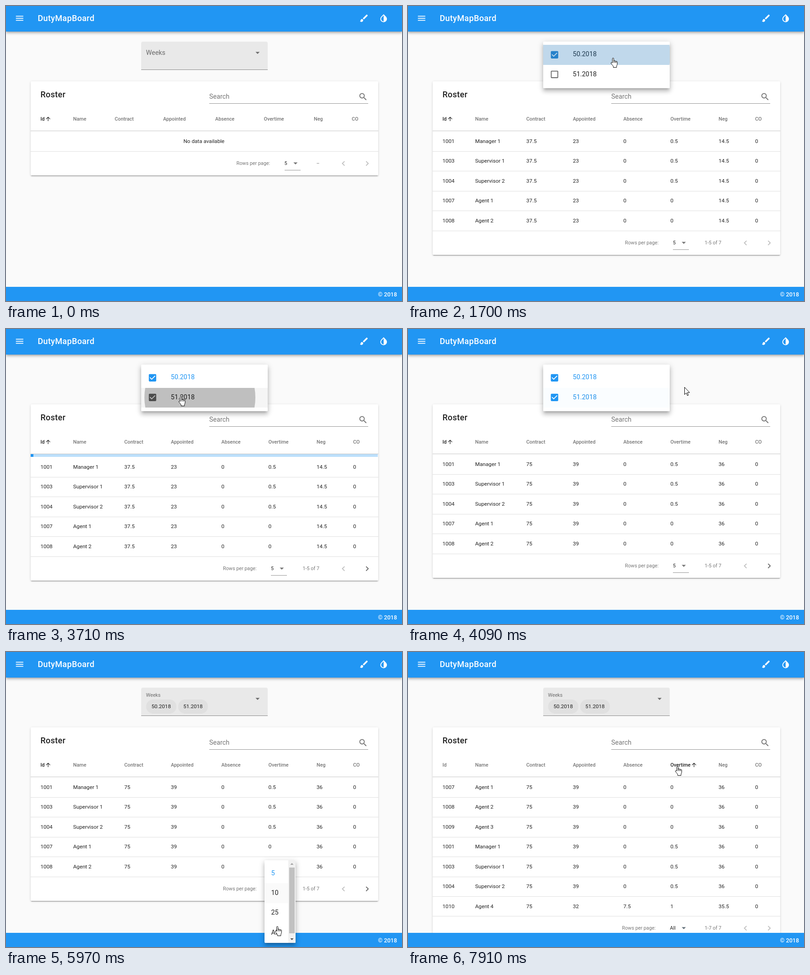
These frames come from a looping animation (867x646 px, 8 s). An HTML page:

```html
<!DOCTYPE html>
<html lang="en">
<head>
<meta charset="utf-8">
<title>Roster</title>
<style>
html, body { margin: 0; width: 100%; height: 100%; overflow: hidden; background: #fafafa; }
body { position: relative; font-family: Roboto, "Open Sans", sans-serif; color: rgba(0,0,0,.87); }
div, span, svg { position: absolute; }
span { white-space: pre; line-height: 20px; }
svg { overflow: visible; }
.bar { background: #2196f3; color: #fff; }
.top { box-shadow: 0 2px 4px -1px rgba(0,0,0,.2), 0 4px 5px rgba(0,0,0,.14), 0 1px 9px rgba(0,0,0,.12); }
.card { background: #fff; border-radius: 2px;
  box-shadow: 0 3px 1px -2px rgba(0,0,0,.2), 0 2px 2px rgba(0,0,0,.14), 0 1px 5px rgba(0,0,0,.12); }
.menu { background: #fff; border-radius: 2px; overflow: hidden; }
.lift { border-radius: 2px;
  box-shadow: 0 5px 5px -3px rgba(0,0,0,.2), 0 7px 9px 1px rgba(0,0,0,.14), 0 3px 13px 2px rgba(0,0,0,.12); }
.chip { background: #e0e0e0; border-radius: 15px; }
.clip { overflow: hidden; }
.line { background: rgba(0,0,0,.42); }
.rule { background: #e0e0e0; }
.dim { color: rgba(0,0,0,.54); }
.med { font-weight: 500; }
</style>
</head>
<body>
<script>
const LOOP = 8000;
const BLUE = [33, 150, 243, 1], TEXT = [0, 0, 0, .87], GREY = [0, 0, 0, .54], FAINT = [0, 0, 0, .26];
const ICON = {
  menu: "M3 18h18v-2H3v2zm0-5h18v-2H3v2zm0-7v2h18V6H3z",
  brush: "M7 14c-1.66 0-3 1.34-3 3 0 1.31-1.16 2-2 2 .92 1.22 2.49 2 4 2 2.21 0 4-1.79 4-4 0-1.66-1.34-3-3-3zm13.71-9.37l-1.34-1.34c-.39-.39-1.02-.39-1.41 0L9 12.25 11.75 15l8.96-8.96c.39-.39.39-1.02 0-1.41z",
  invert: "M17.66 7.93L12 2.27 6.34 7.93c-3.12 3.12-3.12 8.19 0 11.31C7.9 20.8 9.95 21.58 12 21.58c2.05 0 4.1-.78 5.66-2.34 3.12-3.12 3.12-8.19 0-11.31zM12 19.59c-1.6 0-3.11-.62-4.24-1.76C6.62 16.69 6 15.19 6 13.59s.62-3.11 1.76-4.24L12 5.1v14.49z",
  search: "M15.5 14h-.79l-.28-.27C15.41 12.59 16 11.11 16 9.5 16 5.91 13.09 3 9.5 3S3 5.91 3 9.5 5.91 16 9.5 16c1.61 0 3.09-.59 4.23-1.57l.27.28v.79l5 4.99L20.49 19l-4.99-5zm-6 0C7.01 14 5 11.99 5 9.5S7.01 5 9.5 5 14 7.01 14 9.5 11.99 14 9.5 14z",
  drop: "M7 9.5l5 5 5-5z",
  up: "M4 12l1.41 1.41L11 7.83V20h2V7.83l5.58 5.59L20 12l-8-8-8 8z",
  prev: "M15.41 7.41L14 6l-6 6 6 6 1.41-1.41L10.83 12z",
  next: "M10 6L8.59 7.41 13.17 12l-4.58 4.59L10 18l6-6z",
  off: "M19 5v14H5V5h14m0-2H5c-1.1 0-2 .9-2 2v14c0 1.1.9 2 2 2h14c1.1 0 2-.9 2-2V5c0-1.1-.9-2-2-2z",
  on: "M19 3H5c-1.11 0-2 .9-2 2v14c0 1.1.89 2 2 2h14c1.11 0 2-.9 2-2V5c0-1.1-.89-2-2-2zm-9 14l-5-5 1.41-1.41L10 14.17l7.59-7.59L19 8l-9 9z"
};

// Drawing helpers
const rgba = c => `rgba(${c.join()})`;
const mix = (a, b, p) => rgba(a.map((v, i) => v + (b[i] - v) * p));
const px = v => v + "px";

function place(el, x, y, w, h) {
  el.style.left = px(x);
  el.style.top = px(y);
  if (w !== undefined) el.style.width = px(w);
  if (h !== undefined) el.style.height = px(h);
}
function box(parent, x, y, w, h, cls = "", bg) {
  const el = document.createElement("div");
  el.className = cls;
  if (bg) el.style.background = bg;
  place(el, x, y, w, h);
  return parent.appendChild(el);
}
function label(parent, x, cy, str, size, cls = "") {
  const el = document.createElement("span");
  el.className = cls;
  el.textContent = str;
  el.style.fontSize = px(size);
  place(el, x, cy - 10);
  return parent.appendChild(el);
}
function svg(parent, w, h, view, inner) {
  const el = document.createElementNS("http://www.w3.org/2000/svg", "svg");
  el.setAttribute("viewBox", view);
  el.innerHTML = inner;
  place(el, 0, 0, w, h);
  return parent.appendChild(el);
}
function icon(parent, cx, cy, name, color = rgba(GREY), size = 21.6) {
  const el = svg(parent, size, size, "0 0 24 24", `<path d="${ICON[name]}"/>`);
  place(el, cx - size / 2, cy - size / 2);
  el.style.fill = color;
  return el;
}

// Page
const page = document.body;
const select = box(page, 295.5, 78, 277, 62);
const fill = box(select, 0, 0, 277, 62);
fill.style.borderRadius = "4px 4px 0 0";
const selectLine = box(select, 0, 61, 277, 1);
const weeks = label(select, 11, 24.5, "Weeks", 14.4, "dim");
icon(select, 255, 25, "drop");
const chips = ["50.2018", "51.2018"].map((s, i) => {
  const c = box(select, 11.5 + 69.7 * i, 26, 65.5, 30.5, "chip");
  label(c, 11.5, 15, s, 11.7);
  return c;
});

const card = box(page, 53.5, 165, 761, 206, "card");
label(page, 75.5, 194, "Roster", 18, "med").style.letterSpacing = ".02em";
label(page, 445, 199, "Search", 14.4, "dim");
box(page, 445, 213, 348, 1, "line");
icon(page, 782, 199, "search");

const EMPTY_X = [75.5, 147, 238, 344, 458, 564.5, 674, 757];
const DATA_X = [75.5, 147, 259, 361, 471.5, 574.5, 680, 760];
const heads = ["Id", "Name", "Contract", "Appointed", "Absence", "Overtime", "Neg", "CO"]
  .map((s, i) => label(page, EMPTY_X[i], 247.5, s, 10.8, "med dim"));
const idArrow = icon(page, 92, 247, "up", rgba(TEXT), 14.4);
const otArrow = icon(page, 626, 247, "up", rgba(TEXT), 14.4);
box(page, 53.5, 273, 761, 1, "", "#c6c6c6");
const loader = box(page, 53.5, 274, 760.5, 6, "clip", "#bcdffb");
const loadHead = box(loader, 0, 0, 0, 6, "", "#2196f3");
const body = box(page, 0, 274, 867, 0);

const pager = box(page, 0, 318, 867, 53);
const perPage = label(pager, 0, 26.5, "Rows per page:", 10.8, "dim");
const count = label(pager, 0, 26.5, "5", 10.8);
const countDrop = icon(pager, 604, 26.5, "drop");
const countLine = box(pager, 0, 41, 35, 1);
const range = label(pager, 0, 26.5, "", 10.8, "dim");
icon(pager, 738.5, 26.5, "prev", rgba(FAINT));
const next = icon(pager, 791, 26.5, "next");

const bar = box(page, 0, 0, 867, 56, "bar top");
icon(bar, 30, 27, "menu", "#fff");
label(bar, 69.5, 27, "DutyMapBoard", 18, "med").style.letterSpacing = ".02em";
icon(bar, 784, 27, "brush", "#fff");
icon(bar, 827, 27, "invert", "#fff");
const foot = box(page, 0, 615, 867, 31, "bar");
label(foot, 814.5, 16.5, "© 2018", 12.6, "med");

// Week menu
const weekMenu = box(page, 295.5, 78, 277, 102, "lift");
const weekList = box(weekMenu, 0, 0, 277, 102, "menu");
const weekItems = ["50.2018", "51.2018"].map((s, i) => {
  const row = box(weekList, 0, 7 + 43.5 * i, 277, 43.5, "clip");
  return {
    row,
    off: icon(row, 25.3, 21.5, "off", "rgba(0,0,0,.6)"),
    on: icon(row, 25.3, 21.5, "on"),
    text: label(row, 65.3, 21.3, s, 14.4),
    wave: box(row, 0, 0, 0, 0)
  };
});
weekItems.forEach(w => w.wave.style.borderRadius = "50%");

// Rows-per-page menu
const rowMenu = box(page, 566, 456, 68, 181, "lift");
const rowList = box(rowMenu, 0, 0, 68, 181, "menu");
const rowItems = ["5", "10", "25", "All"].map((s, i) => {
  const row = box(rowList, 0, 7 + 43.4 * i, 52, 43.4);
  label(row, 14.5, 21.5, s, 14.4).style.color = i ? "" : rgba(BLUE);
  return row;
});
box(rowList, 52, 0, 16, 181, "", "#f1f1f1");
box(rowList, 54, 16, 12, 144, "", "#c1c1c1");
svg(rowList, 68, 181, "0 0 68 181",
  '<path d="M56.5 10h7l-3.5-4z" fill="#a3a3a3"/><path d="M56.5 171h7l-3.5 4z" fill="#505050"/>');

// Pointers
const arrow = svg(page, 12, 20, "0 0 12 20",
  '<path d="M.5.5v16l3.7-3.5 2.5 5.9 2.3-1-2.5-5.7h5z" fill="#fff" stroke="#000"/>');
const hand = svg(page, 17, 23, "0 0 17 23",
  `<path d="M4.5 11.5v-9a1.5 1.5 0 0 1 3 0V8a1.4 1.4 0 0 1 2.8.3 1.3 1.3 0 0 1 2.5.6 1.3 1.3 0 0 1 2.4.8V14
  c0 2-1.5 3.5-1.5 5.5V21.5H6.5v-2C6 17.5 3.5 15.5 1.8 13 .6 11 2.5 9.8 4.5 11.5z" fill="#fff" stroke="#000"/>
  <path d="M7.5 8v3.5M10.3 8.5v3M12.8 9v2.5" stroke="#000" fill="none"/>`);

// Table contents
const lineY = n => Math.round(.3 + 43.45 * n);
const staff = ["Manager 1", "Supervisor 1", "Supervisor 2", "Agent 1", "Agent 2", "Agent 3", "Agent 4"];
const ids = [1001, 1003, 1004, 1007, 1008, 1009, 1010];
function rowsOf(s) {
  const rows = staff.map((name, i) => {
    const ot = i < 3 ? .5 : 0;
    if (s.week === 1) return [ids[i], name, 37.5, 23, 0, ot, 14.5, 0];
    return i < 6 ? [ids[i], name, 75, 39, 0, ot, 36, 0] : [ids[i], name, 75, 32, 7.5, 1, 35.5, 0];
  });
  if (s.sorted) rows.sort((a, b) => a[5] - b[5]);
  return rows.slice(0, s.size);
}
let shown = "";
function fillTable(s) {
  const key = JSON.stringify(s);
  if (key === shown) return;
  shown = key;
  body.replaceChildren();
  const rows = s.week ? rowsOf(s) : [[]];
  rows.forEach((r, i) => {
    r.forEach((v, c) => label(body, DATA_X[c], 22 + 43.45 * i, String(v), 11.7));
    box(body, 53.5, lineY(i + 1), 761, 1, "rule");
  });
  if (!s.week) label(body, 388.5, 21.7, "No data available", 11.7);
  const xs = s.week ? DATA_X : EMPTY_X;
  heads.forEach((h, i) => h.style.left = px(xs[i]));

  const shift = s.load ? 6 : 0, end = 274 + shift + lineY(rows.length);
  const all = s.size === 7, x = !s.week ? 609.5 : all ? 573.5 : 580;
  body.style.top = px(274 + shift);
  pager.style.top = px(end);
  card.style.height = px(end + 53 - 165);
  perPage.style.left = px(x - 105);
  count.style.left = px(x);
  count.textContent = all ? "All" : "5";
  countLine.style.left = px(x);
  countDrop.style.left = px((s.week ? 604 : 633.5) - 10.8);
  range.textContent = s.week ? `1-${s.size} of 7` : "–";
  range.style.left = px(s.week ? 649.5 : 679.5);
}

// Value at t from pairs of time, value
function key(t, ...k) {
  if (t <= k[0]) return k[1];
  for (let i = 2; i < k.length; i += 2) {
    if (t < k[i]) {
      const u = (t - k[i - 2]) / (k[i] - k[i - 2]);
      return k[i - 1] + (k[i + 1] - k[i - 1]) * u * u * (3 - 2 * u);
    }
  }
  return k[k.length - 1];
}

// Pointer stops: time, x, y
const PATH = [
  [300, 731, 542], [850, 452, 112], [1070, 450, 112], [1150, 449, 114], [2000, 449, 114], [2230, 718, 130],
  [2700, 718, 130], [2990, 461, 108], [3180, 461, 108], [3540, 383, 148], [3880, 383, 148], [4170, 655, 122],
  [4320, 655, 122], [4730, 608, 502], [5100, 600, 516], [5180, 599, 518], [5420, 598, 531], [5600, 598, 531],
  [5970, 594, 601], [6440, 594, 601], [7210, 752, 340], [7290, 752, 340], [7640, 590, 250]
];
const PATH_X = PATH.flatMap(p => [p[0], p[1]]), PATH_Y = PATH.flatMap(p => [p[0], p[2]]);

function ripple(el, t, start, x, y, tint) {
  const u = Math.min(1, Math.max(0, (t - start) / 250)), p = 1 - (1 - u) ** 2;
  const r = 140 * (.3 + .7 * p);
  place(el, x + (138.5 - x) * p - r, y + (21.7 - y) * p - r, 2 * r, 2 * r);
  el.style.background = mix(TEXT, BLUE, tint);
  el.style.opacity = key(t, start, 0, start + 90, .25, start + 290, .25, start + 570, 0);
}

function render(t) {
  const x = key(t, ...PATH_X), y = key(t, ...PATH_Y);
  const loading = (t >= 1500 && t < 1640) || (t >= 3700 && t < 3940);
  fillTable({
    week: t < 1640 ? 0 : t < 3940 ? 1 : 2,
    size: t < 6150 ? 5 : 7,
    sorted: t >= 7700,
    load: loading
  });
  loader.style.display = loading ? "" : "none";
  loadHead.style.width = (t - (t < 3000 ? 1500 : 3700)) * 108 / 1320 + "%";

  const hover = key(t, 650, 0, 850, 1, 2100, 1, 2300, 0, 2780, 0, 2950, 1, 3700, 1, 3900, 0);
  fill.style.background = `rgba(0,0,0,${.065 + .055 * hover})`;
  selectLine.style.background = `rgba(0,0,0,${.42 + .45 * hover})`;
  const picked = t >= 1450;
  weeks.style.fontSize = px(picked ? 10.8 : 14.4);
  weeks.style.top = px(picked ? 7 : 14.5);
  chips[0].style.display = picked ? "" : "none";
  chips[1].style.display = t >= 3600 ? "" : "none";

  const open = key(t, 850, 0, 1070, 1, 2100, 1, 2390, 0, 3150, 0, 3450, 1, 4330, 1, 4620, 0);
  weekMenu.style.opacity = open;
  const overMenu = x > 295 && x < 573;
  const tints = [key(t, 1540, 0, 1760, 1), key(t, 3720, 0, 3950, 1)];
  const inks = [key(t, 1660, 0, 1950, 1), key(t, 3850, 0, 4120, 1)];
  weekItems.forEach((w, i) => {
    const top = 85 + 43.5 * i, on = t >= (i ? 3680 : 1500);
    w.row.style.background = overMenu && y >= top && y < top + 43.5 ? "#f5f5f5" : "";
    w.off.style.display = on ? "none" : "";
    w.on.style.display = on ? "" : "none";
    w.on.style.fill = mix([0, 0, 0, .6], BLUE, tints[i]);
    w.text.style.color = mix(TEXT, BLUE, inks[i]);
  });
  ripple(weekItems[0].wave, t, 1425, 153, 29, tints[0]);
  ripple(weekItems[1].wave, t, 3570, 87, 20, tints[1]);

  rowMenu.style.opacity = key(t, 5600, 0, 5850, 1, 6150, 1, 6480, 0);
  const glow = [0, key(t, 5650, 0, 5780, 1, 5850, 1, 6080, 0), key(t, 5850, 0, 5900, .2, 5960, 0), key(t, 5970, 0, 6150, 1)];
  rowItems.forEach((r, i) => r.style.background = `rgba(0,0,0,${.04 * glow[i]})`);

  next.style.fill = mix(FAINT, [0, 0, 0, .6], key(t, 1750, 0, 2100, 1, 6250, 1, 6550, 0));
  countLine.style.background = `rgba(0,0,0,${key(t, 5100, .42, 5400, .87)})`;
  countDrop.style.fill = mix(GREY, BLUE, key(t, 5650, 0, 5850, 1, 7700, 1, 7990, 0));

  const idOn = key(t, 7660, 1, 7900, 0), otOn = key(t, 7500, 0, 7850, 1);
  heads[0].style.color = mix(GREY, TEXT, idOn);
  heads[5].style.color = mix(GREY, TEXT, otOn);
  idArrow.style.opacity = idOn;
  otArrow.style.opacity = otOn;

  const pointing = (overMenu && y > 78 && y < (open > .5 ? 180 : 140)) ||
    (x > 565 && x < 620 && y > 513 && t > 4800) || (x < 640 && y > 235 && y < 262 && t > 7290);
  hand.style.display = t >= 300 && pointing ? "" : "none";
  arrow.style.display = t >= 300 && !pointing ? "" : "none";
  place(hand, x - 6, y - 1);
  place(arrow, x, y);
}

const begin = performance.now();
function tick() {
  render((performance.now() - begin) % LOOP);
  requestAnimationFrame(tick);
}
tick();
</script>
</body>
</html>
```
